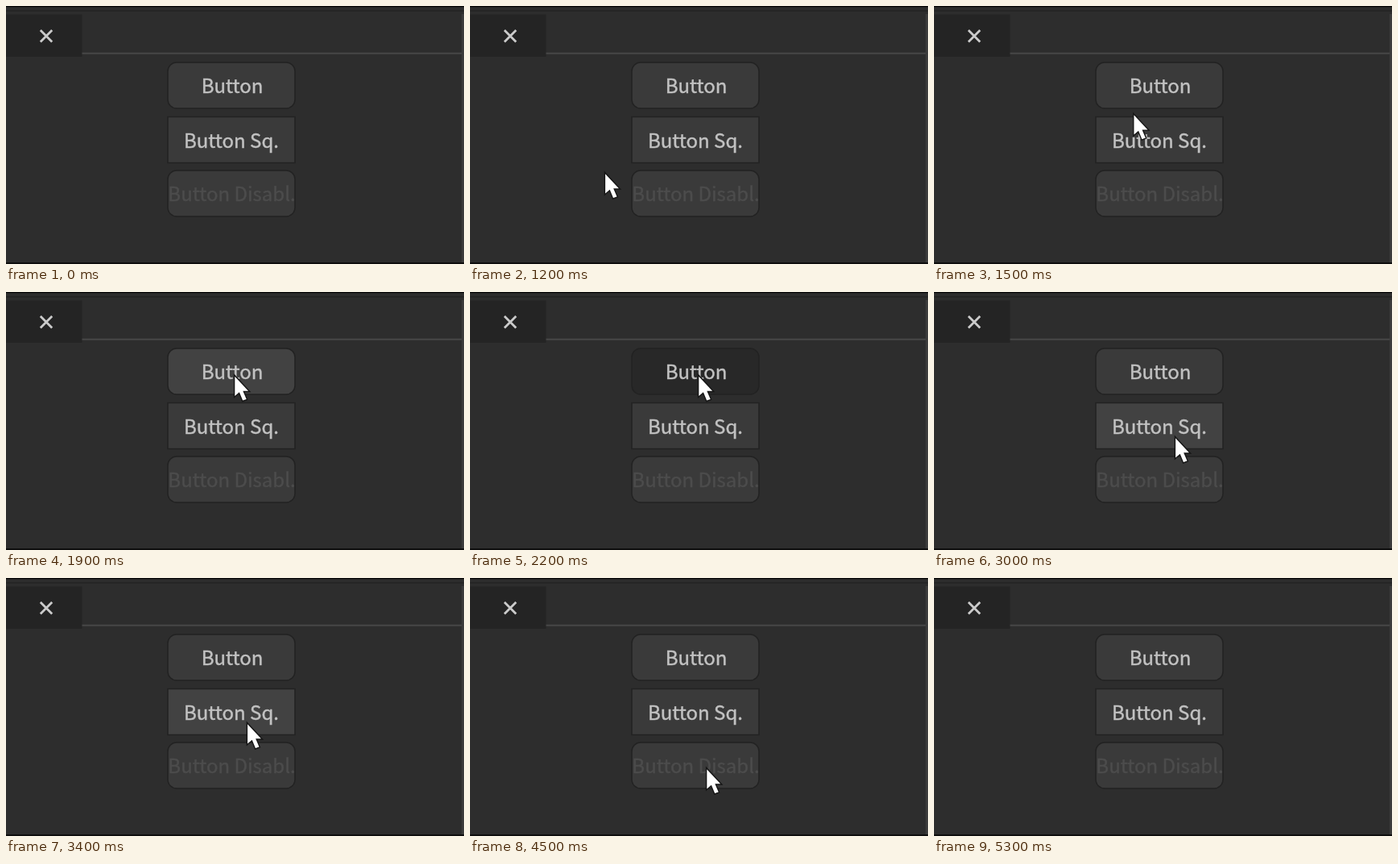
Animation of 569 by 320 pixels, one loop 5.8 s. Source, as an HTML page:

```html
<!DOCTYPE html>
<html lang="en">
<head>
<meta charset="utf-8">
<title>Button states</title>
<style>
  html, body { margin: 0; width: 100%; height: 100%; overflow: hidden; background: #2d2d2d; }
  svg { display: block; width: 569px; height: 320px; }
  text {
    font: 24px "Noto Sans CJK SC", "Noto Sans CJK JP", "Noto Sans CJK", "Noto Sans", sans-serif;
    text-anchor: middle;
    fill: #c2c2c2;
    stroke: #c2c2c2;
    stroke-width: .45;
  }
  .button rect { fill: #3a3a3a; stroke: #222; stroke-width: 1.5; }
  .button.hover rect { fill: #424242; }
  .button.pressed rect { fill: #282828; }
  .button.disabled text { fill: #4c4c4c; stroke: #4c4c4c; }
  #cursor { fill: #fff; stroke: #151515; stroke-width: 1.4; }
</style>
</head>
<body>
<svg viewBox="0 0 569 320">
  <rect width="569" height="320" fill="#2d2d2d"/>
  <path d="M0 6H569" stroke="#232323" stroke-width="1.5"/>
  <rect y="10.5" width="94.5" height="52.5" fill="#242424"/>
  <path d="M94.5 58.8H566" stroke="#474747" stroke-width="2"/>
  <path d="M567.5 10V318" stroke="#3b3b3b" stroke-width="3"/>
  <path d="M42.8 30L57.2 44.4M57.2 30L42.8 44.4" stroke="#cbcbcb" stroke-width="2.8"/>

  <g class="button" id="rounded">
    <rect x="201" y="70" width="158" height="57" rx="11"/>
    <text x="281" y="108">Button</text>
  </g>
  <g class="button" id="square">
    <rect x="201" y="137.5" width="158" height="57"/>
    <text x="280" y="176">Button Sq.</text>
  </g>
  <g class="button disabled">
    <rect x="201" y="204" width="158" height="57" rx="11"/>
    <text x="280.5" y="242">Button Disabl.</text>
  </g>

  <path id="cursor" d="M.4 .4V28L6.4 22.8L10.6 33L16.4 30.8L12.2 21H19.6Z"/>
  <path d="M0 .5H569M0 319H569" stroke="#050505" stroke-width="1.6"/>
</svg>
<script>
  const LOOP = 5800, STEP = 100;
  const $ = id => document.getElementById(id);
  const cursor = $('cursor');

  const entry = { x: 167, y: 206 };
  const moves = [
    { from: 1200, to: 1700, x: 275, y: 108 },
    { from: 1800, to: 1900, x: 283.2, y: 102.5 },
    { from: 2500, to: 3000, x: 299, y: 179 },
    { from: 3600, to: 3900, x: 293.2, y: 235 },
    { from: 5000, to: 5300, x: 257, y: 330 }
  ];
  const buttons = [
    { el: $('rounded'), top: 71, press: 2200, release: 2300 },
    { el: $('square'), top: 139, press: 3200, release: 3400 }
  ];

  const ease = k => k < .5 ? 4 * k ** 3 : 1 - 4 * (1 - k) ** 3;
  const progress = (t, a, b) => ease(Math.min(1, Math.max(0, (t - a) / (b - a))));

  function pointerAt(t) {
    return moves.reduce((p, m) => {
      const k = progress(t, m.from, m.to);
      return { x: p.x + (m.x - p.x) * k, y: p.y + (m.y - p.y) * k };
    }, entry);
  }

  function render(t) {
    const { x, y } = pointerAt(t);
    const visible = t >= moves[0].from;
    cursor.style.visibility = visible ? 'visible' : 'hidden';
    cursor.setAttribute('transform', `translate(${x} ${y})`);
    for (const { el, top, press, release } of buttons) {
      const over = visible && x > 201 && x < 359 && y >= top && y < top + 55;
      el.classList.toggle('hover', over);
      el.classList.toggle('pressed', t >= press && t < release);
    }
  }

  const start = performance.now();
  function tick() {
    const t = (performance.now() - start) % LOOP;
    render(Math.floor(t / STEP) * STEP);
    requestAnimationFrame(tick);
  }
  tick();
</script>
</body>
</html>
```
